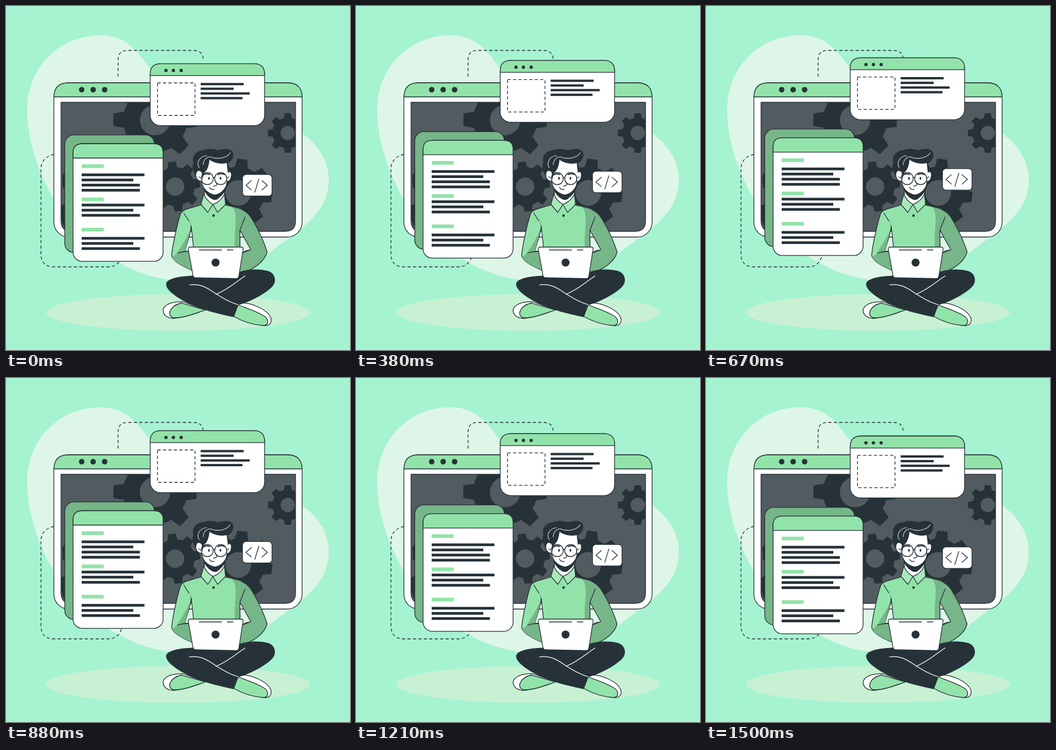
An HTML page that plays this animation: 600 px wide and 600 px high, repeating every 1540 ms.

```html
<!DOCTYPE html>
<html lang="en">
<head>
<meta charset="utf-8">
<title>Web developer</title>
<style>
  html, body { margin: 0; width: 100%; height: 100%; overflow: hidden; background: #a6f3d1; }
  svg { display: block; width: 100vw; height: 100vh; }
  .line { stroke: #263238; stroke-width: 1.3; stroke-linecap: round; stroke-linejoin: round; }
  .none { fill: none; }
  .white { fill: #fff; }
  .green { fill: #92e3a9; }
  .shade { fill: #76b688; }
  .pale { fill: #a8e9ba; }
  .dark { fill: #263238; }
  .screen { fill: #525b60; }
  .dash { stroke-dasharray: 5.5 4; stroke-linecap: butt; }
  .thin { stroke: #fff; stroke-width: 1.2; stroke-linecap: round; }
</style>
</head>
<body>
<svg viewBox="0 0 600 600">
  <defs>
    <clipPath id="view"><path d="M96 168H505V375Q505 393 487 393H114Q96 393 96 375Z"/></clipPath>
  </defs>

  <!-- backdrop -->
  <path fill="#def6e7" d="M165 51C204 51 226 74 243 98C295 170 370 172 440 188C505 203 563 245 563 303C563 366 506 392 455 434C412 465 350 478 290 478C240 473 200 452 160 425C92 376 37 270 37 182C37 105 95 51 165 51Z"/>
  <ellipse cx="300" cy="534.5" rx="230" ry="32" fill="#c8f1d4"/>
  <path class="line none dash" d="M195.5 123V94Q195.5 77.500 212 77.500H327Q344 77.500 344 94.500"/>
  <path class="line none dash" d="M84 259C70 261 61 271 61 284V432Q61 455 84 455H178Q197 455 202 436"/>

  <!-- monitor -->
  <rect class="line white" x="83.500" y="134" width="433" height="269" rx="26"/>
  <path class="line green" d="M83.500 158.500Q84 134 109 134H491Q516 134 516.500 158.500Z"/>
  <g class="dark">
    <circle cx="132" cy="146" r="4.800"/><circle cx="152" cy="146" r="4.800"/><circle cx="172" cy="146" r="4.800"/>
  </g>
  <g clip-path="url(#view)">
    <rect class="screen" x="96" y="168" width="409" height="225"/>
    <g id="gears"></g>
    <path class="dark" d="M104 288L98 296L99 317L104 320ZM104 345L96 348V366L98 378L104 390Z"/>
  </g>
  <path class="line none" d="M96 168H505V375Q505 393 487 393H114Q96 393 96 375Z"/>

  <!-- floating panels -->
  <g id="float">
    <rect class="line shade" x="102.500" y="225" width="156.500" height="205" rx="16"/>
    <rect class="line white" x="117" y="240.300" width="157" height="205.200" rx="16"/>
    <path class="line green" d="M117 265.300V256Q117 240.300 133 240.300H258Q274 240.300 274 256V265.300Z"/>
    <g id="text"></g>
    <rect class="line white" x="251.500" y="100.700" width="199.500" height="108" rx="18"/>
    <path class="line green" d="M251.500 121.500V119Q251.500 100.700 270 100.700H432.500Q451 100.700 451 119V121.500Z"/>
    <g class="dark">
      <circle cx="279" cy="112.500" r="2.900"/><circle cx="292" cy="112.500" r="2.900"/><circle cx="305.500" cy="112.500" r="2.900"/>
    </g>
    <rect class="line none dash" x="264.300" y="134.300" width="65.300" height="56.500"/>
    <rect class="line white" x="412.500" y="294" width="51.500" height="37.500" rx="6"/>
    <path class="line none" d="M428 304.500L418.500 312.800L428 321M441 302L434 325M446.500 304.500L456 312.800L446.500 321"/>
  </g>

  <!-- arms and torso -->
  <path class="line green" d="M341 347C326 352 310 353 305 361C299 378 290 420 289 435C290 446 312 456 327 462L325 428H312C315 413 322 400 323 384L320 365Z"/>
  <path class="shade" d="M320 393C315 405 305 419 298 432L290 438C292 446 312 456 326 461L325 429H312C315 414 320 402 320 393Z"/>
  <path class="line shade" d="M408 354C418 357 425 364 430 373C440 390 450 411 455.500 429C451 445 433 461 405 467L412 431L427 425L408 391Z"/>
  <path class="green" d="M341 346C331 350 322 352 316 355L323 384L327 421H409L408 391L412 356C403 351 393 349 383 346Z"/>
  <path class="shade" d="M391 349C407 356 398 385 399 421H409L408 391L416 368L411 354C404 351 397 350 391 349Z"/>
  <path class="line none" d="M340 347C326 352 310 353 305 361M383 347C394 350 404 351 411 355M310 361L319 375M323 384L327 420M417 368L408 391V420M299 431Q308 428 318 428M413 430Q419 426 425 426"/>

  <!-- neck and head -->
  <path class="line white" d="M346 318V332Q353 344 361 347Q373 343 381 330V316Z"/>
  <path class="line pale" d="M345 328L340 346L352 360L361 346Q350 340 345 328ZM381 328L383 346L369 360L361 346Q375 341 381 328Z"/>
  <circle class="dark" cx="362" cy="365.500" r="2.200"/>
  <path class="dark" d="M333 300C326 291 323 280 327 273C323 263 331 252 344 251.500C352 248 363 249 370 252C377 249 388 248 393 252C400 257 396 271 386 275C392 281 392 290 388 298L384 316C382 326 375 332 369 337C364 340 359 337 355 334C348 328 344 322 343 308Z"/>
  <path class="line white" d="M342 290C337 284 331 287 331 295C332 303 337 307 343 305ZM386 291C391 286 394 290 393 297C392 303 389 307 385 306Z"/>
  <path class="white" d="M342 306L345 291C351 288 354 278 355 268C364 275 376 276 385 274L387 292L384 312C381 321 373 328 364 329C354 327 345 320 343 310Z"/>
  <path class="thin none" opacity=".75" d="M337 282C331 272 339 262 350 261M344 277C344 269 349 264 356 263C368 268 385 266 391 256"/>
  <g class="line none">
    <circle cx="351" cy="301" r="10.500"/><circle cx="374.500" cy="301" r="10.500"/>
    <path d="M361.500 300Q363 298 364 300M340.500 300L336 298M385 300L389 298M364 304L368 311Q367 314 362 314M355 316Q357 321 363 320"/>
    <path stroke-width="2" d="M344 295Q349 291 355 294M370 294Q376 291 381 294"/>
  </g>
  <g class="dark"><ellipse cx="354" cy="300.500" rx="1.500" ry="2.600"/><ellipse cx="374" cy="300.500" rx="1.500" ry="2.600"/></g>

  <!-- shoes and legs -->
  <path class="line white" d="M309 516C291 515 276 520 274 530C274 540 283 546 295 544.500C315 542 333 536 348 530Z"/>
  <path class="line green" d="M306 518L348 530C330 536 312 544 293 544C279 541 285 523 306 518Z"/>
  <path class="line white" d="M408 518C428 517 456 529 462 544C464 552 460 558 451 557.500L404 525Z"/>
  <path class="line green" d="M404 521L396.500 541C412 550 431 556 449 557.500C460 556 458 545 449 540C436 532 419 527 404 521Z"/>
  <path class="line dark" d="M327 471C304 472 283 475 280 484C278 496 305 514 337 526C358 534 378 538 397 542L405 521C425 516 450 502 462 491C472 482 470 468 458 463C444 459 425 459 408 464L404 475Z"/>
  <path class="thin none" stroke-width="1.500" d="M320 486.500C341 483 354 494 368 503C382 512 394 518 405 521M417 471C402 480 389 494 366 503"/>

  <!-- laptop -->
  <path class="line white" d="M322 420.500H410Q414 420.500 413.500 424.500L406 472Q405 475.500 402 475.500L330 474Q327 474 326.300 471L318 425Q317.500 420.500 322 420.500Z"/>
  <path class="line none" d="M337 425.500H376M386 425.500H396"/>
  <circle class="dark" cx="365.500" cy="447.500" r="7"/>
</svg>
<script>
  const NS = "http://www.w3.org/2000/svg";
  const byId = id => document.getElementById(id);

  function add(parent, tag, attrs) {
    const el = document.createElementNS(NS, tag);
    for (const key in attrs) el.setAttribute(key, attrs[key]);
    parent.appendChild(el);
  }

  // Eight-toothed wheel: center, tip radius, body radius, hole radius, turn in degrees
  function gear(cx, cy, tip, body, hole, turn) {
    const at = (r, deg) => {
      const a = deg * Math.PI / 180;
      return (cx + r * Math.cos(a)).toFixed(1) + " " + (cy + r * Math.sin(a)).toFixed(1);
    };
    const pts = [];
    for (let i = 0; i < 8; i++) {
      const a = turn + i * 45;
      pts.push(at(body, a - 14.5), at(tip, a - 8.5), at(tip, a + 8.5), at(body, a + 14.5), at(body, a + 22.5));
    }
    add(byId("gears"), "path", { class: "dark", d: "M" + pts.join("L") + "Z" });
    add(byId("gears"), "circle", { class: "screen", cx, cy, r: hole });
  }

  gear(260, 199, 73.5, 56, 26.5, 0.5);
  gear(295, 315, 44, 34, 16, -8);
  gear(405, 326, 60, 46, 22.5, 7);
  gear(491.5, 221.5, 35, 27, 12.5, 0);

  function bars(x, y, step, h, ends, cls = "dark") {
    ends.forEach((end, i) =>
      add(byId("text"), "rect", { class: cls, x, y: y + i * step, width: end - x, height: h }));
  }

  [276.2, 334.2, 387].forEach(y => bars(132, y, 0, 6.4, [170.5], "green"));
  bars(132, 292.2, 8.95, 4.7, [241.5, 222, 233.5, 233.5]);
  bars(132, 344.9, 8.95, 4.7, [241.5, 222, 233.5]);
  bars(132, 402.9, 8.95, 4.7, [241.5, 222, 233.5]);

  const panel = byId("float");
  add(panel, "g", { id: "lines" });
  [414.5, 397, 425, 412.5].forEach((end, i) =>
    add(byId("lines"), "rect", { class: "dark", x: 339.5, y: 134.3 + i * 8.15, width: end - 339.5, height: 4 }));

  const LOOP = 1540, FPS = 24, TOP = 720, LOW = 0.7, RISE = 11.9;

  function draw(now) {
    const t = now % LOOP;
    const held = Math.floor((t + 4.9) * FPS / 1000) * 1000 / FPS;
    const half = LOOP / 2;
    const fromTop = Math.abs(held - TOP);
    const dist = Math.min(fromTop, LOOP - fromTop);
    const y = LOW - RISE * (1 - dist / half);
    panel.setAttribute("transform", `translate(0 ${y.toFixed(2)})`);
  }

  let start;
  function tick(now) {
    if (start === undefined) start = now;
    draw(now - start);
    requestAnimationFrame(tick);
  }
  draw(0);
  requestAnimationFrame(tick);
</script>
</body>
</html>
```
